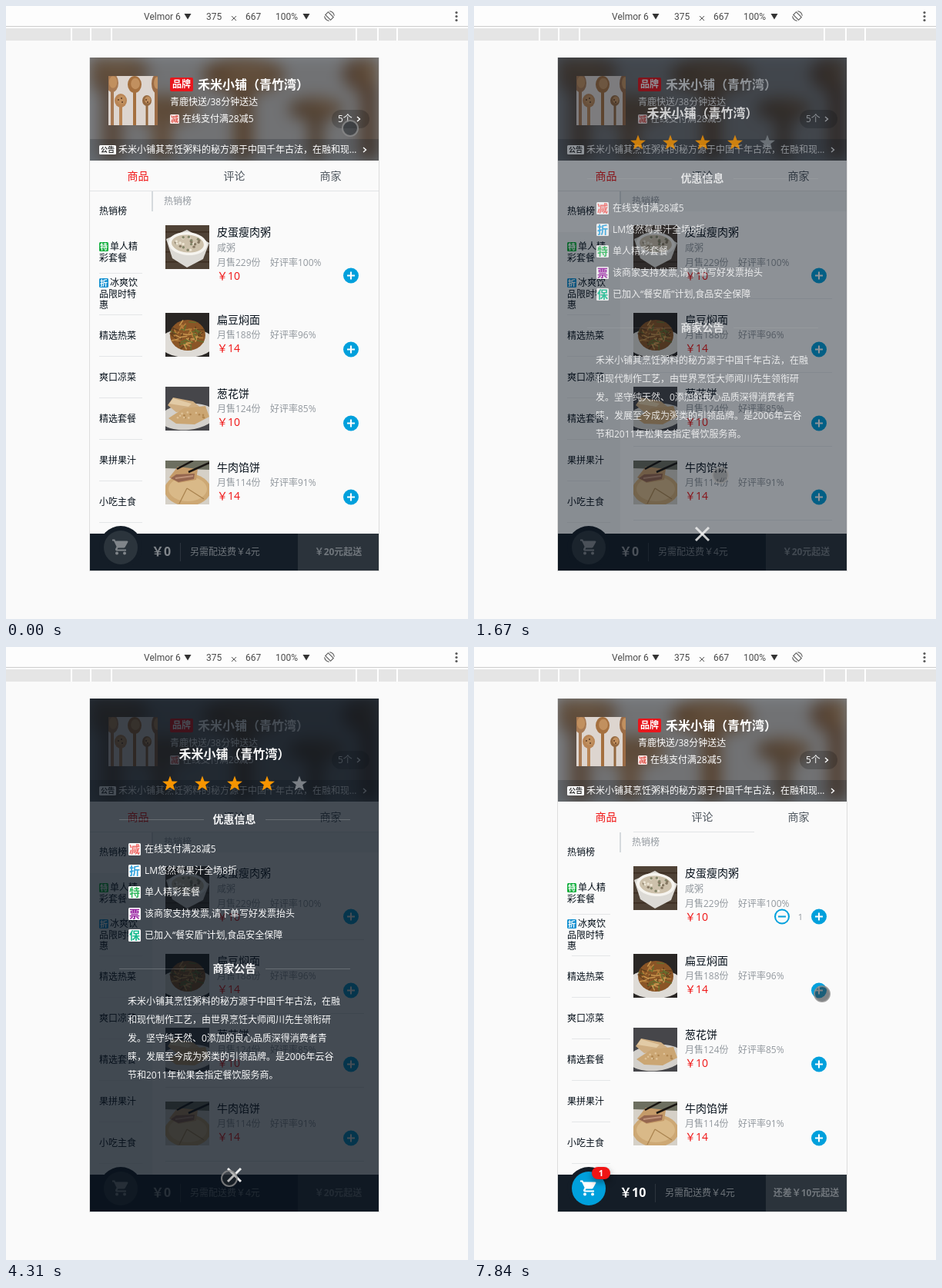
These frames come from a looping animation (600 by 797 pixels, 8 s). An HTML page with a canvas:

```html
<!DOCTYPE html>
<html lang="zh">
<head>
<meta charset="utf-8">
<style>
html, body { margin: 0; width: 100%; height: 100%; overflow: hidden; background: #fafafa; }
canvas { display: block; width: 600px; height: 797px; }
</style>
</head>
<body>
<canvas id="stage"></canvas>
<script>
const W = 600, H = 797, LOOP = 8000;
const canvas = document.getElementById('stage');
const dpr = window.devicePixelRatio || 1;
canvas.width = W * dpr;
canvas.height = H * dpr;
const stage = canvas.getContext('2d');
let c = stage;

const FONT = '"Open Sans", "Noto Sans CJK SC", "Noto Sans CJK", sans-serif';
const BLUE = '#00a0dc', RED = '#f01414', GREY = '#93999f', INK = '#07111b';
const SHOP = '禾米小铺', SHOP_FULL = SHOP + '（青竹湾）';
const CART = new Path2D('M7 18a2 2 0 1 0 0 4 2 2 0 0 0 0-4zM1 2v2h2l3.6 7.6-1.35 2.45C4.5 15.4 5.5 17 7 17h12v-2H7.4l1.1-2h7.45c.75 0 1.4-.4 1.75-1l3.6-6.5A1 1 0 0 0 20.4 4H5.2l-.95-2zM17 18a2 2 0 1 0 0 4 2 2 0 0 0 0-4z');

// Drawing helpers
const rect = (x, y, w, h, fill) => { c.fillStyle = fill; c.fillRect(x, y, w, h); };

function pill(x, y, w, h, r, fill) {
  c.fillStyle = fill;
  c.beginPath();
  c.roundRect(x, y, w, h, r);
  c.fill();
}

function oval(x, y, rx, ry, fill, angle = 0) {
  c.fillStyle = fill;
  c.beginPath();
  c.ellipse(x, y, rx, ry, angle, 0, 7);
  c.fill();
}

const disc = (x, y, r, fill) => oval(x, y, r, r, fill);

function stroke(points, color, width = 1) {
  c.strokeStyle = color;
  c.lineWidth = width;
  c.beginPath();
  points.forEach(([x, y], i) => i ? c.lineTo(x, y) : c.moveTo(x, y));
  c.stroke();
}

function poly(points, fill) {
  c.fillStyle = fill;
  c.beginPath();
  points.forEach(([x, y]) => c.lineTo(x, y));
  c.fill();
}

// y is the vertical middle of the glyphs
function text(s, x, y, size, color, { bold = false, align = 'left', font = FONT } = {}) {
  c.font = `${bold ? 700 : 400} ${size}px ${font}`;
  c.textAlign = align;
  c.fillStyle = color;
  c.fillText(s, x, Math.round(y + size * 0.37));
}

function badge(s, x, y, size, fill, color) {
  pill(x, y, size, size, 1.5, fill);
  text(s, x + size / 2, y + size / 2, size - 2, color, { bold: true, align: 'center' });
}

const chevron = (x, y) => stroke([[x - 2, y - 3], [x + 1.5, y], [x - 2, y + 3]], '#fff', 1.4);

function clipped(x, y, w, h, draw) {
  c.save();
  c.beginPath();
  c.rect(x, y, w, h);
  c.clip();
  c.translate(x, y);
  draw();
  c.restore();
}

function seeded(seed) {
  return () => (seed = (seed * 16807) % 2147483647) / 2147483647;
}

// Timing helpers
const clamp = v => Math.min(1, Math.max(0, v));

function bezier(p, x1, y1, x2, y2) {
  const at = (s, a, b) => 3 * (1 - s) * (1 - s) * s * a + 3 * (1 - s) * s * s * b + s * s * s;
  let lo = 0, hi = 1;
  for (let i = 0; i < 24; i++) {
    const mid = (lo + hi) / 2;
    if (at(mid, x1, x2) < p) lo = mid; else hi = mid;
  }
  return at(lo, y1, y2);
}

const ease = p => p <= 0 ? 0 : p >= 1 ? 1 : bezier(p, 0.25, 0.1, 0.25, 1);

function overlayAlpha(t) {
  const step = start => ease((t - start) / 500);
  return step(110) - step(1540) + step(3085) - step(4270);
}

const PATH = [
  [560, 447, 159], [1270, 298, 683], [1640, 298, 683], [2240, 448, 187],
  [3300, 448, 187], [3840, 290, 706], [3950, 290, 706], [4010, 290, 694],
  [4280, 290, 694], [4310, 290, 691], [4450, 290, 691], [5070, 472, 345],
  [5490, 451, 352], [7240, 451, 353], [7540, 469, 471], [7840, 452, 451]
];
const PRESSES = [[0, 110], [1270, 1550], [2790, 3050], [4010, 4290], [5690, 6560], [7840, 8000]];

function pointer(t) {
  const i = PATH.findIndex(k => k[0] > t);
  if (i < 1) return (i ? PATH[PATH.length - 1] : PATH[0]).slice(1);
  const [t0, x0, y0] = PATH[i - 1], [t1, x1, y1] = PATH[i];
  const p = 1 - (1 - (t - t0) / (t1 - t0)) ** 3;
  return [x0 + (x1 - x0) * p, y0 + (y1 - y0) * p];
}

// Browser chrome
function toolbar() {
  const ui = { font: 'Roboto, sans-serif' };
  rect(0, 0, W, 26, '#fdfdfd');
  rect(0, 26, W, 1, '#cccccc');
  rect(0, 27, W, 18, '#fff');
  rect(0, 29, W, 16, '#e5e5e5');
  [84, 109, 136, 454, 482, 507].forEach(x => rect(x, 29, 2, 16, '#fff'));
  [['Velmor 6', 179], ['375', 260], ['667', 311], ['100%', 350]]
    .forEach(([s, x]) => text(s, x, 13.5, 12, '#4a4a4a', ui));
  stroke([[293, 13], [299, 19]], '#5a5a5a');
  stroke([[299, 13], [293, 19]], '#5a5a5a');
  [236, 390].forEach(x => poly([[x - 4.5, 10], [x + 4.5, 10], [x, 17.5]], '#333'));
  c.save();
  c.translate(420, 13);
  c.rotate(-Math.PI / 4);
  c.strokeStyle = '#5a5a5a';
  c.lineWidth = 1.1;
  c.strokeRect(-2.6, -4.8, 5.2, 9.6);
  [0, Math.PI].forEach(a => { c.beginPath(); c.arc(0, 0, 6.3, a - 0.75, a + 0.75); c.stroke(); });
  c.restore();
  [8.5, 13.5, 18.5].forEach(y => disc(585, y, 1.6, '#5a5a5a'));
}

// Pictures
function spoons() {
  rect(0, 0, 64, 64, '#ddd5cf');
  [[5, 9, 8, 12, 4, '#a87a53'], [62, 10, 6, 12, 4, '#9b6c46'], [34, 11, 9, 11, 4, '#a5703f'],
    [16, 32, 8, 9, 4, '#b98555'], [50, 32, 6, 7, 3, '#94683f']]
    .forEach(([x, y, rx, ry, w, color]) => {
      rect(x - w / 2, y, w, 64, color);
      oval(x, y, rx, ry, color);
      oval(x + 1, y - 1, rx * 0.65, ry * 0.65, '#c1905f');
    });
  [[13, 31], [17, 29], [18, 34], [49, 31], [51, 34]].forEach(([x, y]) => disc(x, y, 1, '#5c3b25'));
}

function porridge() {
  rect(0, 0, 57, 57, '#4f4236');
  for (let y = 8; y < 57; y += 13) rect(0, y, 57, 1.5, '#3c2d20');
  poly([[1, 18], [28, 6], [57, 23], [49, 44], [28, 55], [9, 43]], '#dcdad5');
  oval(29, 24, 25, 15, '#f6f4ef', 0.08);
  oval(29, 24, 21, 11.5, '#cdc1ab', 0.08);
  const rnd = seeded(9);
  for (let i = 0; i < 24; i++) {
    const a = rnd() * 7, r = Math.sqrt(rnd());
    disc(29 + 18 * r * Math.cos(a), 24 + 9 * r * Math.sin(a), 1.7, ['#ece4d3', '#857761', '#85876a'][i % 3]);
  }
}

function noodles() {
  rect(0, 0, 57, 57, '#292624');
  oval(28, 39, 36, 19, '#dedbd6');
  oval(29, 29, 23, 20, '#8a5526');
  const rnd = seeded(31);
  for (let i = 0; i < 60; i++) {
    const a = rnd() * 7, r = Math.sqrt(rnd()), b = rnd() * 3.1;
    const x = 29 + 20 * r * Math.cos(a), y = 28 + 18 * r * Math.sin(a);
    stroke([[x - 5 * Math.cos(b), y - 4 * Math.sin(b)], [x + 5 * Math.cos(b), y + 4 * Math.sin(b)]],
      ['#b8803c', '#63401e', '#c99750', '#66702f'][i % 4], 1.5);
  }
}

function pancakes() {
  rect(0, 0, 57, 57, '#46464a');
  oval(29, 39, 36, 17, '#d3d0cb', -0.1);
  poly([[3, 24], [10, 14], [36, 19], [48, 29], [14, 33]], '#cfae82');
  poly([[10, 15], [34, 22], [30, 26], [5, 22]], '#e2cba6');
  poly([[4, 41], [24, 28], [52, 25], [57, 39], [38, 49], [14, 48]], '#cba673');
  const rnd = seeded(5);
  for (let i = 0; i < 14; i++) disc(16 + rnd() * 36, 33 + rnd() * 11, 1.3, i % 2 ? '#b08650' : '#dec298');
}

function meatPie() {
  rect(0, 0, 57, 57, '#d5d0c7');
  poly([[0, 0], [57, 0], [57, 12], [0, 10]], '#6d6f60');
  oval(29, 38, 30, 21, '#cda874');
  oval(29, 37, 25, 16, '#d9b988');
  stroke([[28, 36], [50, 50]], '#a9834f', 1.3);
  stroke([[28, 36], [18, 56]], '#a9834f', 1.3);
  poly([[5, 22], [16, 8], [42, 11], [40, 25], [17, 29]], '#c59b69');
  poly([[7, 23], [14, 18], [38, 17], [37, 24], [17, 28]], '#95664f');
  stroke([[13, 23], [36, 20]], '#bf927a', 2);
  stroke([[15, 11], [36, 0]], '#191512', 2.5);
  stroke([[30, 15], [57, 3]], '#191512', 2.5);
}

const FOODS = [
  ['皮蛋瘦肉粥', 285, '229', 100, 10, porridge],
  ['扁豆焖面', 399, '188', 96, 14, noodles],
  ['葱花饼', 495, '124', 85, 10, pancakes],
  ['牛肉馅饼', 591, '114', 91, 14, meatPie]
];

// Page
function offscreen(w, h, draw) {
  const layer = document.createElement('canvas');
  layer.width = w;
  layer.height = h;
  c = layer.getContext('2d');
  draw();
  c = stage;
  return layer;
}

// The shop picture stretched over the header, blurred and dimmed
const sharp = offscreen(375, 134, () => {
  c.scale(375 / 64, 134 / 64);
  spoons();
});
const backdrop = offscreen(375, 134, () => {
  rect(0, 0, 375, 134, '#fff');
  c.filter = 'blur(10px)';
  c.drawImage(sharp, 0, 0);
  c.filter = 'none';
  rect(0, 0, 375, 134, 'rgba(7,17,27,.5)');
  rect(0, 106, 375, 28, 'rgba(7,17,27,.2)');
});

function header() {
  c.drawImage(backdrop, 109, 67);
  clipped(133, 91, 64, 64, spoons);
  pill(213, 93, 30, 18, 2, '#e8161c');
  text('品牌', 228, 102, 12, '#fff', { bold: true, align: 'center' });
  text(SHOP_FULL, 249, 102, 16, '#fff', { bold: true });
  text('青鹿快送/38分钟送达', 213, 125, 12, '#fff');
  badge('减', 213, 141, 12, '#fbe9e7', '#e0554c');
  text('在线支付满28减5', 229, 147, 12, '#fff');
  pill(423, 135, 49, 24, 12, 'rgba(0,0,0,.2)');
  text('5个', 431, 147, 12, '#fff');
  chevron(458, 147);
  pill(121, 181, 22, 12, 1.5, '#fff');
  text('公告', 132, 187, 9, '#333', { bold: true, align: 'center' });
  text(SHOP + '其烹饪粥料的秘方源于中国千年古法，在融和现…', 146, 187, 12, '#fff');
  chevron(466, 187);
}

function menu(lines) {
  text('热销榜', 121, 267, 12, INK);
  badge('特', 121, 307, 12, '#0fae3c', '#fff');
  text('单人精', 135, 313, 12, INK);
  text('彩套餐', 121, 328, 12, INK);
  badge('折', 121, 354, 12, '#118fd0', '#fff');
  text('冰爽饮', 135, 360, 12, INK);
  text('品限时特', 121, 374.5, 12, INK);
  text('惠', 121, 388.5, 12, INK);
  ['精选热菜', '爽口凉菜', '精选套餐', '果拼果汁', '小吃主食']
    .forEach((s, i) => text(s, 121, 428.5 + 54 * i, 12, INK));
  if (lines) for (let y = 347; y < 680; y += 54) rect(lines, y, 177 - lines, 1, '#e4e6e8');
}

function roundButton(x, y, plus) {
  disc(x, y, 10, BLUE);
  if (plus) {
    rect(x - 5, y - 1, 10, 2, '#fff');
    rect(x - 1, y - 5, 2, 10, '#fff');
  } else {
    disc(x, y, 8, '#fafafa');
    rect(x - 5, y - 1, 10, 2, BLUE);
  }
}

function foods() {
  text('热销榜', 205, 254, 12, GREY);
  FOODS.forEach(([name, y, sold, rate, price, photo], i) => {
    const extra = i ? 0 : 20;
    clipped(207, y, 57, 57, photo);
    text(name, 274, y + 9, 14, INK);
    if (!i) text('咸粥', 274, y + 29.5, 12, GREY);
    text(`月售${sold}份`, 274, y + 28.5 + extra, 12, GREY);
    text(`好评率${rate}%`, 343, y + 28.5 + extra, 12, GREY);
    text('￥' + price, 274, y + 46 + extra, 14, RED);
    roundButton(448, y + 47.5 + (i ? 0 : 18), true);
  });
}

function quantity(p) {
  c.save();
  c.globalAlpha = p;
  c.translate(424 - 24 * p, 350.5);
  c.rotate(Math.PI * (1 - p));
  roundButton(0, 0, false);
  c.restore();
  text('1', 424, 351, 11, GREY, { align: 'center' });
}

function cartBar(full) {
  const dim = '#70767c', shift = full ? 9 : 0;
  rect(109, 686, 375, 48, '#141d27');
  rect(379, 686, 105, 48, '#2b333b');
  disc(149, 704, 28, '#141d27');
  disc(149, 704, 22, full ? BLUE : '#2b343c');
  c.save();
  c.translate(137, 691.5);
  c.fillStyle = full ? '#fff' : '#80858a';
  c.fill(CART);
  c.restore();
  text(full ? '￥10' : '￥0', 189, 709, 16, full ? '#fff' : '#80858a', { bold: true });
  rect(226 + shift, 698, 1, 24, '#2c343d');
  text('另需配送费￥4元', 239 + shift, 710, 12, dim);
  text(full ? '还差￥10元起送' : '￥20元起送', 431.5, 710, 12, dim, { bold: true, align: 'center' });
  if (full) {
    c.save();
    c.shadowColor = 'rgba(0,0,0,.4)';
    c.shadowBlur = 8;
    c.shadowOffsetY = 4;
    pill(153, 676, 24, 16, 8, RED);
    c.restore();
    text('1', 165, 684, 11, '#fff', { bold: true, align: 'center' });
  }
}

function page(t, alpha) {
  const full = t >= 6500, calm = alpha < 0.01;
  rect(108, 67, 377, 668, '#dddddd');
  rect(109, 67, 375, 667, '#fafafa');
  // Pale panels only show up once the sheet dims the page
  if (!calm) {
    c.globalAlpha = alpha;
    rect(109, 294, 81, 392, '#eceff1');
    rect(190, 241, 294, 26, '#eceff1');
    [380, 476, 572, 668].forEach(y => rect(207, y, 258, 1, '#dfe2e5'));
    c.globalAlpha = 1;
  }
  rect(189, 241, 2, 26, '#d5d9dd');
  const [left, right] = !calm || t < 2000 ? [109, 484] : t < 4000 ? [207, 457] : [207, 364];
  rect(left, 240, right - left, 1, '#e1e3e5');
  header();
  ['商品', '评论', '商家'].forEach((s, i) =>
    text(s, 171.5 + 125 * i, 221, 14, i ? '#4d555d' : RED, { align: 'center' }));
  menu(!calm || t < 2000 ? 121 : t < 4000 ? 0 : 127);
  foods();
  if (full) quantity(clamp((t - 6500) / 400));
  cartBar(full);
  const p = (t - 6500) / 400;
  if (p >= 0 && p < 1) disc(438 - 289 * p, 324.5 + 379.5 * bezier(p, 0.49, -0.29, 0.75, 0.41), 8, BLUE);
}

// Detail sheet
const OFFERS = [
  ['减', '#f0625f', '在线支付满28减5'],
  ['折', '#2a9fdc', 'LM悠然莓果汁全场8折'],
  ['特', '#2bb65a', '单人精彩套餐'],
  ['票', '#93179d', '该商家支持发票,请下单写好发票抬头'],
  ['保', '#12b98c', '已加入“餐安盾”计划,食品安全保障']
];
const NOTICE = [
  SHOP + '其烹饪粥料的秘方源于中国千年古法，在融',
  '和现代制作工艺，由世界烹饪大师闻川先生领衔研',
  '发。坚守纯天然、0添加的良心品质深得消费者青',
  '睐，发展至今成为粥类的引领品牌。是2006年云谷',
  '节和2011年松果会指定餐饮服务商。'
];

function star(x, y, r, fill) {
  const points = [];
  for (let i = 0; i < 10; i++) {
    const a = Math.PI * (i / 5 - 0.5), d = i % 2 ? r * 0.42 : r;
    points.push([x + d * Math.cos(a), y + d * Math.sin(a)]);
  }
  poly(points, fill);
}

function sheet(alpha) {
  c.save();
  c.globalAlpha = alpha;
  rect(109, 67, 375, 667, 'rgba(7,17,27,.8)');
  [224, 418].forEach(y => [147, 337].forEach(x =>
    rect(x, y, 110, 1, `rgba(255,255,255,${0.22 * alpha})`)));
  // The lettering reads stronger than the veil while fading
  c.globalAlpha = Math.sqrt(alpha);
  text(SHOP_FULL, 296.5, 139, 16, '#fff', { bold: true, align: 'center' });
  for (let i = 0; i < 5; i++) star(213 + 42 * i, 178, 10.5, i < 4 ? '#ff9900' : '#7d8389');
  [['优惠信息', 224], ['商家公告', 418]].forEach(([s, y]) =>
    text(s, 296.5, y, 14, '#fff', { bold: true, align: 'center' }));
  c.globalAlpha = Math.cbrt(alpha);
  OFFERS.forEach(([mark, color, s], i) => {
    const y = 263 + 28 * i;
    badge(mark, 159, y - 8, 16, '#fff', color);
    text(s, 180, y, 12, '#fff');
  });
  NOTICE.forEach((s, i) => text(s, 158, 461 + 24 * i, 12, '#fff'));
  stroke([[288, 678], [305, 695]], '#f2f2f2', 3);
  stroke([[305, 678], [288, 695]], '#f2f2f2', 3);
  c.restore();
}

function touch(t) {
  const [x, y] = pointer(t);
  const pressed = PRESSES.some(([a, b]) => t >= a && t < b);
  disc(x, y, 10, pressed ? 'rgba(45,50,55,.6)' : 'rgba(60,60,60,.3)');
  c.strokeStyle = 'rgba(140,140,140,.8)';
  c.lineWidth = 2;
  c.beginPath();
  c.arc(x, y, 10, 0, 7);
  c.stroke();
}

function draw(t) {
  c.setTransform(dpr, 0, 0, dpr, 0, 0);
  rect(0, 0, W, H, '#fafafa');
  toolbar();
  const alpha = clamp(overlayAlpha(t));
  page(t, alpha);
  if (alpha > 0.005) sheet(alpha);
  touch(t);
}

const start = performance.now();
function frame() {
  draw((performance.now() - start) % LOOP);
  requestAnimationFrame(frame);
}
frame();
</script>
</body>
</html>
```
